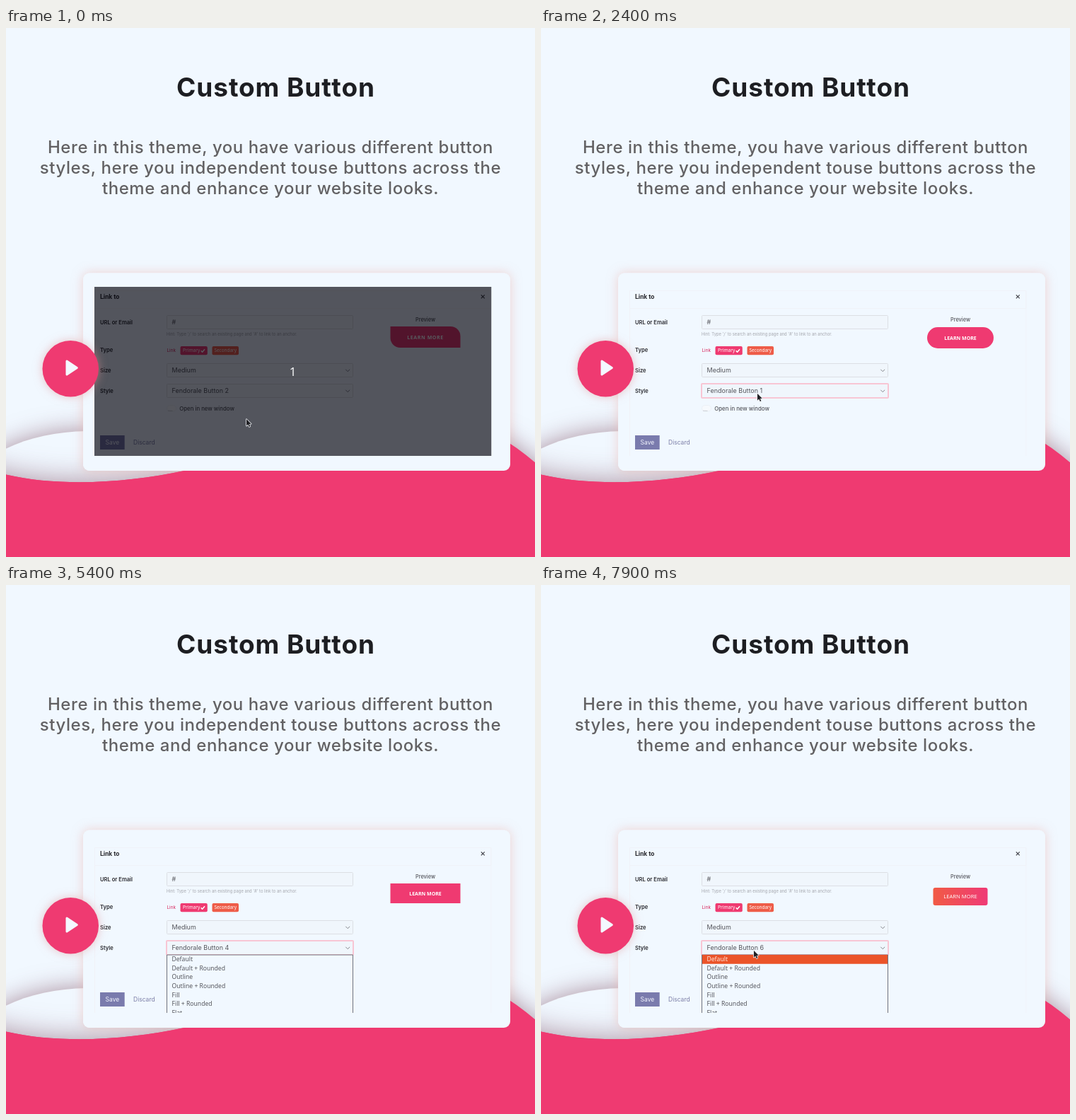
Write an HTML page with a canvas that moves like this. It is 748 by 748 pixels and loops after 8 s.

```html
<!DOCTYPE html>
<html lang="en">
<head>
<meta charset="utf-8">
<title>Custom Button</title>
<style>
html, body { margin: 0; width: 100%; height: 100%; overflow: hidden; background: #f1f8ff; }
canvas { display: block; width: 748px; height: 748px; }
</style>
</head>
<body>
<canvas id="stage" width="748" height="748"></canvas>
<script>
const ctx = document.getElementById('stage').getContext('2d');
const LOOP = 8000, STEP = 100, OVERLAY_END = 100;
const BG = '#f1f8ff', PINK = '#ef3a71', ORANGE = '#eb5429', INK = '#2b2b30', GREY = '#55565c';
const INTER = 'Inter, sans-serif', NOTO = '"Noto Sans", sans-serif', OPEN = '"Open Sans", sans-serif';
const PANEL = { x: 125, y: 366, w: 561.5, h: 239 };
const MID = 593;
const FIELD_Y = 517, LIST_Y = 522.7, ROW_H = 12.65;
const OPTIONS = ['Default', 'Default + Rounded', 'Outline', 'Outline + Rounded', 'Fill', 'Fill + Rounded', 'Flat'];

// every visit to the list: when it opens, pointer x, style shown until a choice is made
const VISITS = [[1100, 325, 2], [2500, 306, 1], [3730, 305, 3], [4950, 308, 4], [6550, 313, 5], [7800, 301, 6]];
const CHOOSE = 750;               // list stays open this long
const RISE_AT = -450, RISE = 250; // pointer returns to the field before the next opening
const HOLD = 145, SPEED = 0.47;   // then rests and moves down the list
const HOVER_LEAD = 60;            // the list reacts ahead of the drawn pointer

const mix = (a, b, p) => a + (b - a) * p;
const smooth = p => { p = Math.min(1, Math.max(0, p)); return p * p * (3 - 2 * p); };
const visitAt = t => VISITS.findIndex(v => t < v[0] + CHOOSE);

function pointerAt(t) {
  const i = visitAt(t), [opened, x] = VISITS[i];
  const [fromX, fromY] = i ? [VISITS[i - 1][1], 640] : [340, 553];
  const age = t - opened, p = smooth((age - RISE_AT) / RISE);
  return [mix(fromX, x, p), mix(fromY, FIELD_Y, p) + Math.max(0, age - HOLD) * SPEED];
}

function text(str, x, y, font, color, align = 'left', spacing = 0) {
  ctx.font = font;
  ctx.fillStyle = color;
  ctx.textAlign = align;
  ctx.letterSpacing = spacing + 'px';
  ctx.fillText(str, x, y);
}

function box(x, y, w, h, r, fill, stroke, line = 1) {
  ctx.beginPath();
  ctx.roundRect(x, y, w, h, r);
  if (fill) { ctx.fillStyle = fill; ctx.fill(); }
  if (stroke) { ctx.strokeStyle = stroke; ctx.lineWidth = line; ctx.stroke(); }
}

function trace(points, close) {
  ctx.beginPath();
  points.forEach(p => ctx.lineTo(...p));
  if (close) ctx.closePath();
}

function polyline(points, color, width) {
  trace(points);
  ctx.strokeStyle = color;
  ctx.lineWidth = width;
  ctx.stroke();
}

function fillPath(path, color) {
  ctx.fillStyle = color;
  ctx.fill(path);
}

function withShadow(color, blur, draw) {
  ctx.save();
  ctx.shadowColor = color;
  ctx.shadowBlur = blur;
  draw();
  ctx.restore();
}

const HILL = 'M-60 640C-20 595 40 571 115 570L252 600';
const SLOPE = 'L700 580Q726 594 760 625L820 690V820H-60Z';
const back = new Path2D(HILL + SLOPE);
const lobe = new Path2D(HILL + 'V660H-60Z');
const wave = new Path2D('M-60 610C20 652 150 648 252 626' + SLOPE);

const card = () => box(109, 346.5, 604, 279.5, 9, BG);

function backdrop() {
  const shade = 'rgba(120,70,90,.6)';
  ctx.fillStyle = BG;
  ctx.fillRect(0, 0, 748, 748);
  withShadow(shade, 34, () => fillPath(back, '#d8c8d0'));
  fillPath(lobe, BG);
  ctx.save();
  ctx.clip(lobe);
  withShadow(shade, 40, () => fillPath(wave, PINK));
  ctx.restore();
  withShadow('rgba(235,170,160,.5)', 15, card);
  fillPath(wave, PINK);
  card();
}

function heading() {
  text('Custom Button', 381.5, 97, '700 37px ' + INTER, '#1d1e22', 'center', 0.9);
  const lines = [
    'Here in this theme, you have various different button',
    'styles, here you independent touse buttons across the',
    'theme and enhance your website looks.'
  ];
  lines.forEach((s, i) => text(s, 374, 177 + 29 * i, '500 24px ' + INTER, '#626163', 'center', 0.55));
}

function field(y, value, dropdown, focus) {
  box(227.5, y + 0.5, 263, 19, 1, '#f0f6fc', '#dcdfe4');
  if (focus) box(227, y, 264, 20, 1, null, '#f8c6d4', 2);
  text(value, 234.5, y + 13.3, '400 9px ' + INTER, GREY);
  if (dropdown) polyline([[480.3, y + 8.8], [483.2, y + 11.7], [486.1, y + 8.8]], '#77787e', 0.9);
}

function gradient(w, from, to) {
  const g = ctx.createLinearGradient(MID - w / 2, 0, MID + w / 2, 0);
  g.addColorStop(0, from);
  g.addColorStop(1, to);
  return g;
}

const BUTTONS = {
  1: { w: 94, h: 30, y: 423, r: 15 },
  2: { w: 99, h: 30, r: [0, 14, 0, 14], spacing: 0.6 },
  3: { w: 88.5, h: 31, size: 8 },
  4: { w: 99, h: 28 },
  5: { w: 88, h: 30, r: [7, 14, 4, 14], spacing: 0.7, colors: ['#f55f99', '#f27a68'] },
  6: { w: 77, h: 25, y: 428, r: 3, weight: 400, size: 7.7, colors: ['#f15b45', '#ef3a76'] }
};

function preview(style) {
  const { w, h, y = 422, r = 0, weight = 700, size = 7, spacing = 0, colors } = BUTTONS[style];
  text('Preview', MID, 414.6, '500 7.4px ' + INTER, GREY, 'center');
  box(MID - w / 2, y, w, h, r, colors ? gradient(w, ...colors) : PINK);
  text('LEARN MORE', MID, y + h / 2 + 2.6, `${weight} ${size}px ${OPEN}`, '#fff', 'center', spacing);
}

function form(style, focus) {
  box(125.5, 371.5, 560.5, 300, 0, null, '#f1f1f7');
  box(125.5, 371.5, 560.5, 25, 0, null, '#f0f2f8');

  text('Link to', 133, 383.3, '700 9px Roboto, sans-serif', INK);
  text('×', 674.3, 383.2, '500 12px ' + INTER, '#44454b', 'center');
  [['URL or Email', 418.6], ['Type', 458.4], ['Size', 486.7], ['Style', 515.6]]
    .forEach(([label, y]) => text(label, 133, y, '600 7.6px ' + INTER, INK));

  field(406, '#');
  text("Hint: Type '/' to search an existing page and '#' to link to an anchor.",
    227, 434.6, '400 5.8px ' + INTER, '#a4a6ac');

  text('Link', 227.5, 458.2, '400 6.4px ' + INTER, '#d8285f');
  box(246.5, 450, 38.3, 12.2, 2, PINK);
  text('Primary', 250, 458.4, '400 6.6px ' + NOTO, '#fff');
  polyline([[275.7, 456.3], [277.6, 458.2], [281, 454.2]], '#fff', 1.5);
  box(291.5, 450, 37.5, 12.2, 2, '#ee5c48');
  text('Secondary', 310.2, 458.4, '400 6.4px ' + NOTO, '#fff', 'center');

  field(474, 'Medium', true);
  field(503, 'Fendorale Button ' + style, true, focus);

  box(227.5, 533.5, 13, 8.5, 4.2, '#f6f9fd', '#e9ecf2', 0.7);
  polyline([[229, 541.2], [235.5, 541.4]], '#bfc3ca', 0.8);
  text('Open in new window', 245.3, 540.5, '500 7.8px ' + INTER, GREY);

  box(133, 576, 34.7, 20, 0, '#7a7bad');
  text('Save', 150.4, 589, '400 8.5px ' + INTER, '#f4f6ff', 'center');
  text('Discard', 180, 589, '400 8.5px ' + INTER, '#7b7da6');
  preview(style);
}

function dropdown(y) {
  box(227.5, 523, 263, 100, 0, BG, '#70727a');
  const hover = Math.floor((y - LIST_Y) / ROW_H);
  OPTIONS.forEach((label, i) => {
    const top = LIST_Y + i * ROW_H;
    if (i === hover) box(228, top + 0.4, 262, ROW_H, 0, ORANGE);
    text(label, 234.5, top + 9.4, '400 8.6px ' + NOTO, i === hover ? '#ffe9df' : GREY);
  });
}

function cursor(x, y) {
  ctx.save();
  ctx.translate(x, y);
  trace([[0, 0], [0, 9.6], [2.2, 7.6], [3.8, 11], [5.3, 10.3], [3.8, 7], [6.7, 6.8]], true);
  ctx.lineJoin = 'round';
  ctx.strokeStyle = '#e9ecf0';
  ctx.lineWidth = 1.6;
  ctx.stroke();
  ctx.fillStyle = '#202024';
  ctx.fill();
  ctx.restore();
}

function playButton() {
  withShadow('rgba(225,150,150,.55)', 13, () => box(51.5, 442, 79.5, 79.5, 40, PINK));
  trace([[86, 471], [86, 490], [100.3, 480.5]], true);
  ctx.lineJoin = 'round';
  ctx.lineWidth = 3;
  ctx.strokeStyle = ctx.fillStyle = '#f4f8ff';
  ctx.fill();
  ctx.stroke();
}

function render(t) {
  const [opened, , style] = VISITS[visitAt(t)];
  const { x, y, w, h } = PANEL;
  backdrop();
  heading();

  ctx.save();
  ctx.beginPath();
  ctx.rect(x, y, w, h);
  ctx.clip();
  form(style, t >= VISITS[0][0]);
  if (t >= opened) dropdown(pointerAt(t + HOVER_LEAD)[1]);
  if (t < OVERLAY_END) {
    ctx.fillStyle = 'rgba(0,0,8,.655)';
    ctx.fillRect(x, y, w, h);
    text('1', 405.5, 492, '400 17px ' + OPEN, '#fff', 'center');
  }
  cursor(...pointerAt(t));
  ctx.restore();

  playButton();
}

const start = performance.now();
function tick() {
  const t = (performance.now() - start) % LOOP;
  render(Math.floor(t / STEP) * STEP);
  requestAnimationFrame(tick);
}
tick();
</script>
</body>
</html>
```
